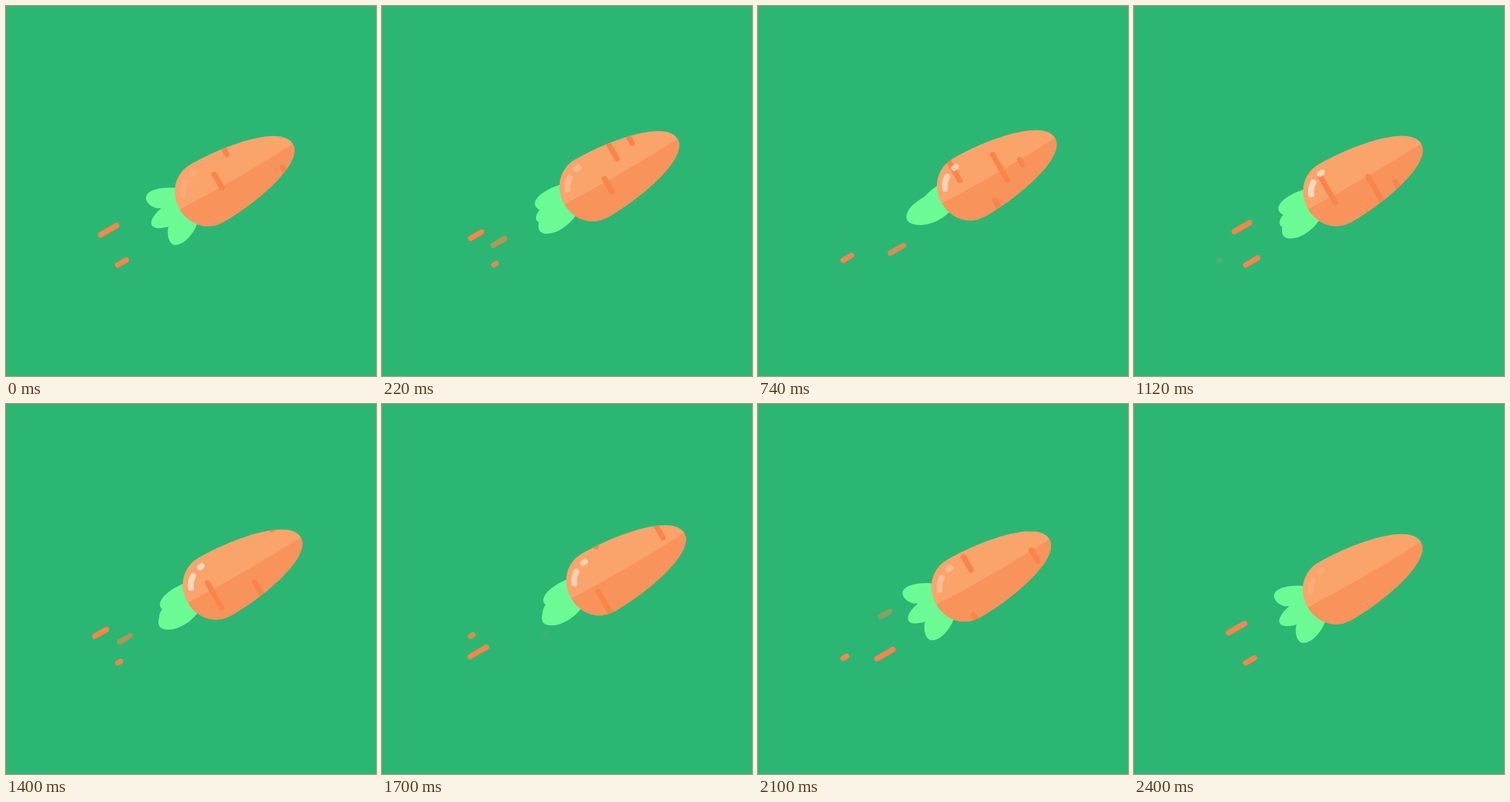
An HTML page for the animation above (2420 ms loop, 500 px wide and 500 px high).

```html
<!DOCTYPE html>
<html lang="en">
<head>
<meta charset="utf-8">
<title>Flying carrot</title>
<style>
  html, body { margin: 0; width: 100%; height: 100%; overflow: hidden; background: #2cb674; }
  svg { display: block; width: 100%; height: 100%; }
  .leaf { fill: #6cfa94; }
  .stroke { fill: none; stroke: #fa854a; stroke-width: 7.4; stroke-linecap: round; }
  .shine { fill: none; stroke: #fff; stroke-width: 8; stroke-linecap: round; }
</style>
</head>
<body>
<svg viewBox="0 0 500 500">
  <defs>
    <path id="shape" d="M0 0C0 -25 18 -45 43 -45C97 -45 176.6 -30 176.6 0C176.6 29.6 97 44.7 43 44.7C18 44.7 0 25 0 0Z"/>
    <clipPath id="body"><use href="#shape"/></clipPath>
  </defs>
  <!-- x runs along the carrot towards its tip -->
  <g transform="translate(234.6 274.6) rotate(-30)">
    <g id="streaks"></g>
    <g id="carrot">
      <path class="leaf" d="M14 -14C-10 -18 -43 -12 -43.5 0C-43 12 -10 18 14 14Z"/>
      <path class="leaf" id="upper" d="M28 -10C12 -31 -20 -47 -30.5 -38C-36 -32 -31 -19 -23.5 -15.4C-14 -9 0 -4 14 -6Z"/>
      <path class="leaf" id="lower" d="M28 6C16 36 -20 48 -30.5 38C-36 32 -31 19 -25 13.5C-18 4 -4 -8 10 -12Z"/>
      <use href="#shape" fill="#faa46b"/>
      <g clip-path="url(#body)">
        <path fill="#f8935c" d="M-5 0Q85 4 180 0V60H-5Z"/>
        <g id="rings"></g>
      </g>
      <g id="shine">
        <path class="shine" d="M24.3 -27.5Q16.5 -22.5 13.7 -14.9"/>
        <path class="shine" d="M38 -33L41 -33.4"/>
      </g>
    </g>
  </g>
</svg>
<script>
const LOOP = 2420, CYCLE = 2400;
const $ = id => document.getElementById(id);

function addLine(parent) {
  const el = document.createElementNS('http://www.w3.org/2000/svg', 'line');
  el.setAttribute('class', 'stroke');
  return $(parent).appendChild(el);
}
function place(el, x1, y1, x2, y2) {
  const at = { x1, y1, x2, y2 };
  for (const k in at) el.setAttribute(k, at[k].toFixed(2));
}

// far end, side offset, start time
const streaks = [[-119, -23.4, 748], [-138, 0, 0], [-110, 23.4, 468]]
  .map(([end, y, start]) => ({ end, y, start, el: addLine('streaks') }));

// position along the body, front edge at time 0, length
const rings = [[36.4, -64, 39], [64, 3.2, 20.6], [92.3, -32, 40], [120.5, -40, 8], [148.2, 38.2, 17.5]]
  .map(([x, edge, len]) => ({ x, edge, len, el: addLine('rings') }));

const mod = (a, n) => (a % n + n) % n;
const sineOut = p => Math.sin(p * Math.PI / 2);

function draw(t) {
  const half = mod(t, 1200) / 600;
  const push = 25 * (half < 1 ? sineOut(half) : 1 - sineOut(half - 1));
  $('carrot').setAttribute('transform', `translate(${push.toFixed(2)} 0)`);

  const fold = 44 * (1 - Math.abs(1 - mod(t, 300) / 150));
  $('upper').setAttribute('transform', `rotate(${-fold} 12 -18.5)`);
  $('lower').setAttribute('transform', `rotate(${fold} 13.4 -11)`);

  $('shine').setAttribute('opacity', 0.08 + 0.5 * Math.sin(Math.PI * mod(t, CYCLE) / CYCLE));

  for (const s of streaks) {
    const p = mod(t - s.start, 1200) / 1200;
    const grow = Math.max(0, 1 - p / 0.4);
    const tail = s.end + 88 * (1 - p) ** 2;
    const head = Math.max(s.end, tail - 25 * (1 - grow * grow));
    place(s.el, head, s.y, tail, s.y);
    s.el.setAttribute('opacity', Math.min(1, p * 3.6, (1 - p) * 4));
  }

  $('rings').setAttribute('visibility', t < CYCLE ? 'visible' : 'hidden');
  for (const r of rings) {
    const y = mod(r.edge + t / 15 + 80, 160) - 80;
    place(r.el, r.x, y - r.len, r.x, y);
  }
}

const begin = performance.now();
function frame() {
  draw((performance.now() - begin) % LOOP);
  requestAnimationFrame(frame);
}
frame();
</script>
</body>
</html>
```
